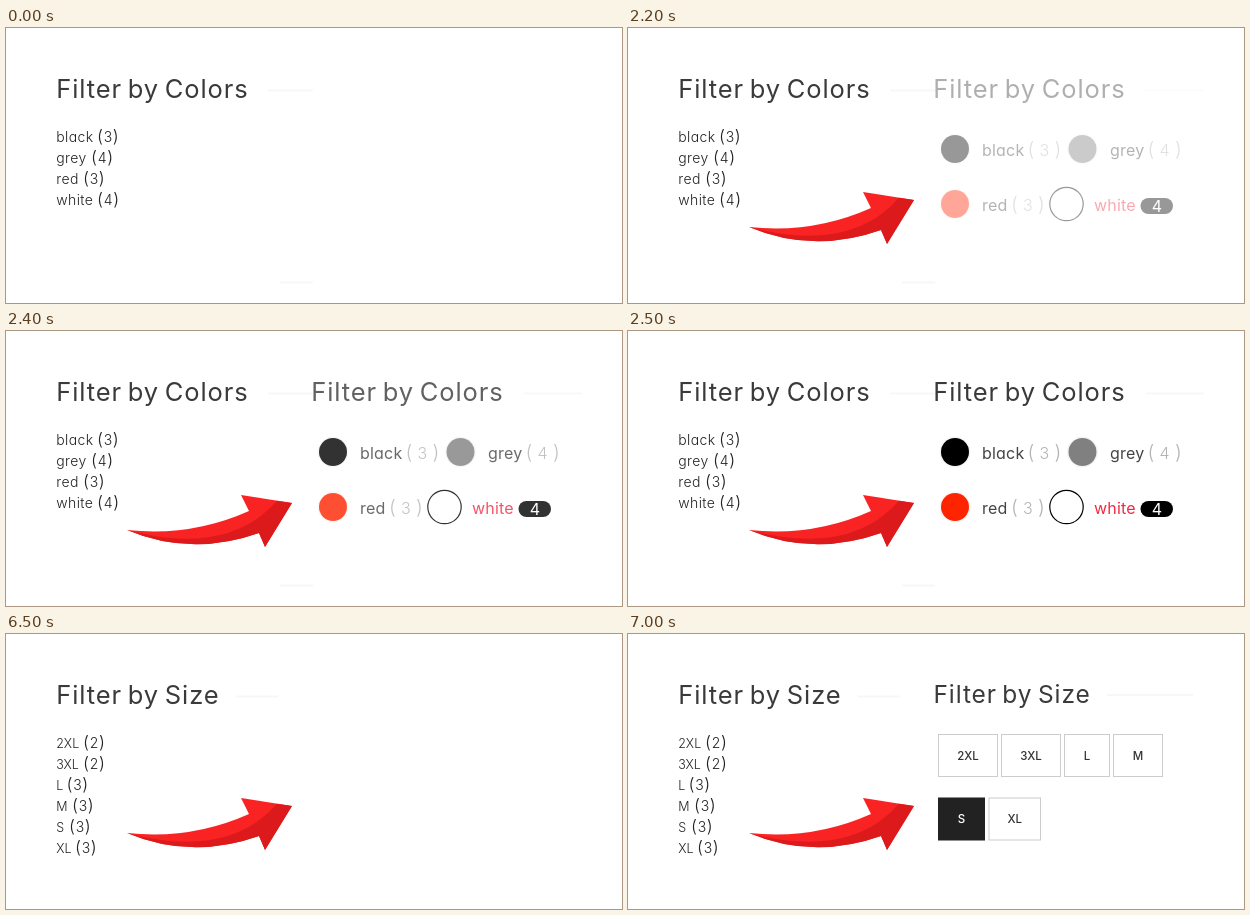
Write an HTML page that moves like this. It is 616 by 275 pixels and loops after 9 s.

```html
<!DOCTYPE html>
<html lang="en">
<head>
<meta charset="utf-8">
<title>Filters</title>
<style>
  html, body { margin: 0; width: 100%; height: 100%; overflow: hidden; background: #fff; }
  svg { display: block; width: 616px; height: 275px; }
  text { font-family: Inter, sans-serif; font-feature-settings: "cv11"; fill: #333; white-space: pre; }
  .title { font-size: 25.5px; letter-spacing: .9px; word-spacing: -2.3px; fill: #3a3a3a; }
  .title.small { font-size: 24.5px; }
  .item { font-size: 14px; font-weight: 300; letter-spacing: .4px; fill: #222; }
  .size { font-size: 12.5px; font-weight: 300; fill: #222; }
  .count { font-size: 14px; font-weight: 300; letter-spacing: .7px; fill: #222; }
  .paren { font-size: 1.22em; }
  .label { font-size: 16px; letter-spacing: .2px; fill: #444; }
  .faint { font-size: 16px; font-weight: 300; letter-spacing: .4px; fill: #b4b4b4; }
  .active { fill: #f22840; }
  .pill { font-size: 16px; fill: #fff; text-anchor: middle; }
  .button { font-size: 11.5px; font-weight: 500; text-anchor: middle; }
  .on { fill: #fff; }
</style>
</head>
<body>
<svg id="stage" viewBox="0 0 616 275"></svg>
<script>
const text = (cls, x, y, s) => `<text class="${cls}" x="${x}" y="${y}">${s}</text>`;
const rule = (x1, x2, y) => `<path d="M${x1} ${y}H${x2}" stroke="#f7f7f7" stroke-width="2"/>`;
const count = (cls, x, y, s) =>
  text(cls, x, y, `<tspan class="paren">(</tspan>${s}<tspan class="paren">)</tspan>`);

const list = (cls, rows) => rows.map(([name, x, n], i) =>
  text(cls, 50.2, 114 + 21 * i, name) + count('count', x, 114 + 21 * i, n)).join('');

const dot = (x, y, fill) =>
  `<circle cx="${x}" cy="${y}" r="15" fill="#fff" stroke="#f2f2f2"/>
   <circle cx="${x}" cy="${y}" r="14" fill="${fill}"/>`;

const swatch = (x, y, fill, name, labelX, countX, n) =>
  dot(x, y, fill) + text('label', labelX, y + 7, name) + count('faint', countX, y + 7, ` ${n} `);

const button = (x, y, w, name, on) =>
  `<rect x="${x + .5}" y="${y + .5}" width="${w - 1}" height="42"
    fill="${on ? '#222' : '#fff'}" stroke="${on ? '#222' : '#ccc'}"/>` +
  text(on ? 'button on' : 'button', x + w / 2, y + 25.5, name);

const colorList = text('title', 50.3, 70, 'Filter by Colors') + rule(262, 307, 62.5) + rule(274, 307, 254.5) +
  list('item', [['black', 91, 3], ['grey', 85, 4], ['red', 77, 3], ['white', 91, 4]]);

const colorPanel = text('title', 305.3, 70, 'Filter by Colors') + rule(518, 576, 62.5) +
  swatch(327, 121, '#000', 'black', 354, 399.5, 3) +
  swatch(454.5, 121, '#808080', 'grey', 482, 519.5, 4) +
  swatch(327, 176, '#ff2400', 'red', 354, 383, 3) +
  '<circle cx="438.5" cy="176" r="16.7" fill="#fff" stroke="#000" stroke-width="1.2"/>' +
  text('label active', 466, 183, 'white') +
  '<rect x="512.5" y="170" width="32.5" height="16" rx="8"/>' + text('pill', 529, 183.5, 4);

const sizeList = text('title', 50.3, 70, 'Filter by Size') + rule(230, 272, 62.5) +
  list('size', [['2XL', 77, 2], ['3XL', 77, 2], ['L', 60.5, 3], ['M', 66, 3], ['S', 63, 3], ['XL', 69, 3]]);

const sizePanel = text('title small', 305.5, 68.5, 'Filter by Size') + rule(479, 565, 61) +
  button(310, 100, 60, '2XL') + button(373, 100, 60, '3XL') +
  button(436, 100, 46, 'L') + button(485, 100, 50, 'M') +
  button(310, 163.5, 47, 'S', true) + button(360.5, 163.5, 52.5, 'XL');

const arrow = `<g id="arrow">
  <path fill="#fa2323" d="M121 199Q185 206 243 180L235 164L286 172L259 216L253 202Q185 226 121 199"/>
  <path fill="#dc1a1c" d="M121 199Q222 226 271 169.7L286 172L259 216L253 202Q185 226 121 199"/></g>`;

const stage = document.getElementById('stage');
stage.innerHTML = [[colorList, colorPanel], [sizeList, sizePanel]].map(([before, after]) =>
  `<g class="scene">${before}<g class="panel">${after}</g></g>`).join('') + arrow;

const scenes = stage.querySelectorAll('.scene');
const panels = stage.querySelectorAll('.panel');
const arrowNode = document.getElementById('arrow');
const start = performance.now();

function draw() {
  const t = (performance.now() - start) % 9000;
  const current = t < 4500 ? 0 : 1;
  const step = Math.floor((t % 4500 - 2000) / 100);
  const opacity = Math.min(1, Math.max(0, step / 5));
  scenes.forEach((scene, i) => scene.style.display = i === current ? '' : 'none');
  panels.forEach(panel => panel.style.opacity = opacity);
  arrowNode.style.display = step >= 0 ? '' : 'none';
  requestAnimationFrame(draw);
}
draw();
</script>
</body>
</html>
```
